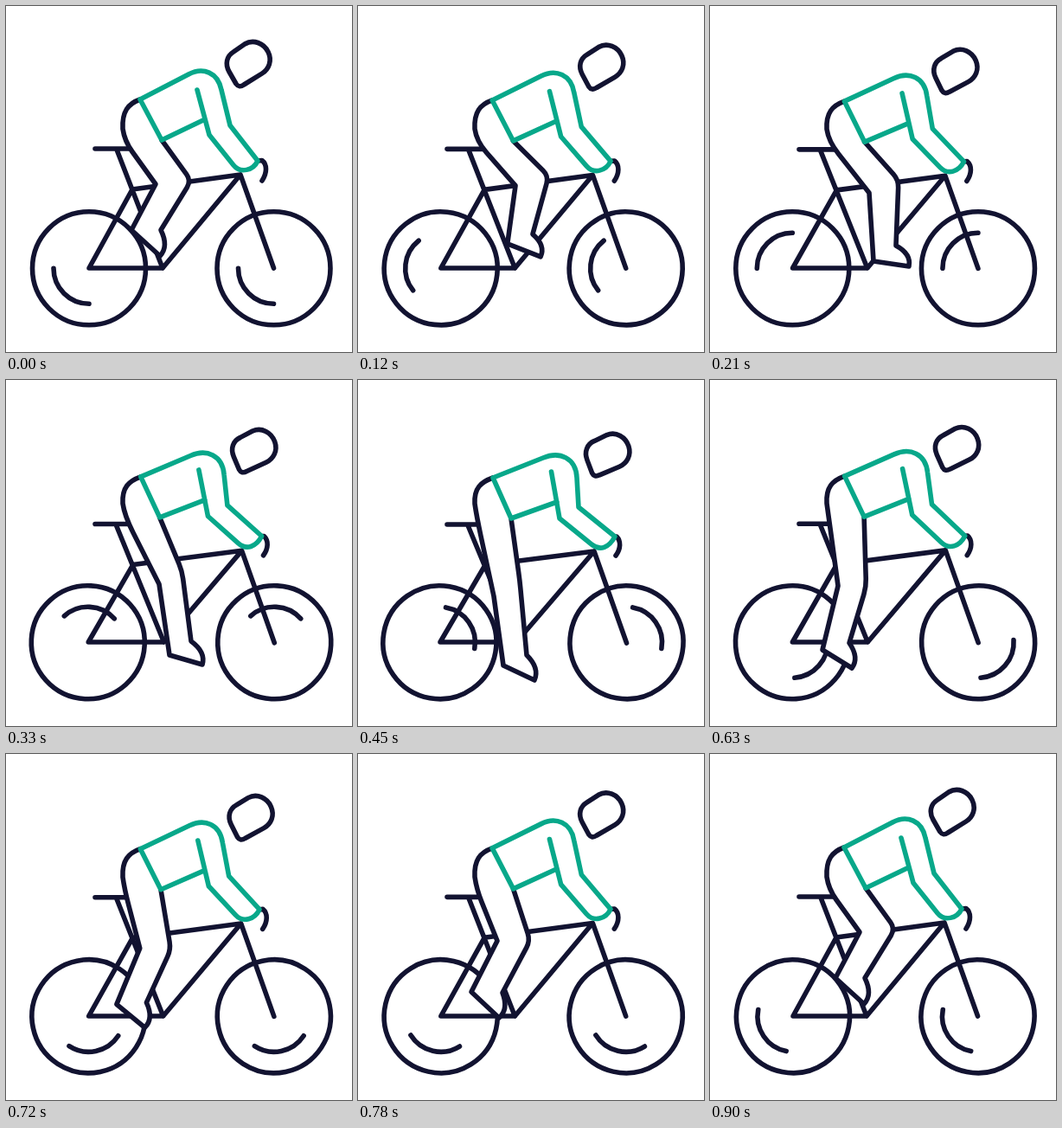
An HTML page that plays this animation: 400 by 400 pixels, repeating every 930 ms.

```html
<!DOCTYPE html>
<html lang="en">
<head>
<meta charset="utf-8">
<title>Cyclist</title>
<style>
  html, body { margin: 0; width: 100%; height: 100%; overflow: hidden; background: #fff; }
  svg { display: block; width: 100vw; height: 100vh; }
  path, circle { fill: none; stroke: #121331; stroke-width: 5.6; stroke-linecap: round; stroke-linejoin: round; }
  #leg { fill: #fff; }
  #shirt { stroke: #08a88a; }
</style>
</head>
<body>
<svg viewBox="0 0 400 400">
  <defs>
    <g id="wheel">
      <circle r="65.5"/>
      <path d="M0 41A41 41 0 0 1 -41 0"/>
    </g>
  </defs>
  <g id="rear"><circle r="65.5"/><path d="M0 41A41 41 0 0 1 -41 0"/></g>
  <g id="front"><circle r="65.5"/><path d="M0 41A41 41 0 0 1 -41 0"/></g>
  <path id="bike"/>
  <path id="leg"/>
  <path id="shirt"/>
  <path id="head" d="M266 90L258 76C253 67 255 58 263 53L276 44C286 38 298 43 303 53C308 63 304 73 296 78L275 91Q269.5 95 266 90Z"/>
</svg>
<script>
const STEP = 30, STEPS = 31, CYCLE = 30;
const el = id => document.getElementById(id);
const lerp = (a, b, p) => a + (b - a) * p;

// Upright and crouched outlines, blended number by number.
const bike = [
  'M103 165L144 165M128 166L181 303L96 303L146 212L271 195L181 303M271 195L309.5 303M291 179L296 178.5C302 183 302 193 296 202',
  'M103 167L144 167M127 168L183 303L95 303L147 214L273 198L183 303M273 198L310.5 304M297 181L299 181C304 186 304 195 298 203'
];
const shirt = [
  'M230 131L180 155L155 108L211 79C228 70 245 77 249 97L259 138L291 179C286 190 271 194 263 184L235 149L221 97',
  'M230 141L177 160L156 113L214 90C233 82 252 90 253 113L255 147L297 181C290 194 280 198 270 190L233 160L223.5 106'
];

function blend([a, b], p) {
  const ends = b.match(/[\d.]+/g);
  let i = 0;
  return a.replace(/[\d.]+/g, n => lerp(+n, +ends[i++], p).toFixed(2));
}

// step, crouch, back of knee, heel, toe, ankle, kneecap
const poses = [
  [0, 0, 173, 206, 145, 259, 178, 289, 179, 259, 214, 202],
  [7, .43, 184, 216, 189, 295, 230, 301, 215, 277, 218, 201],
  [11, .77, 177, 236, 189, 318, 227, 329, 214, 302, 203.5, 221],
  [15, 1, 157, 250, 168, 330, 204, 347, 195, 318, 187, 232],
  [21, .63, 148, 238, 130, 312, 164, 333, 161, 304, 180.5, 239],
  [26, .17, 161, 216, 131, 275, 163, 305, 167, 276, 199, 216]
];
const spin = [[0, 0], [7, 90], [11, 138], [15, 190], [21, 266], [26, 328], [30, 371]];

function poseAt(i) {
  const n = poses.length, lap = Math.floor(i / n), [k, ...v] = poses[i - lap * n];
  return { k: k + lap * CYCLE, v };
}

// Cyclic cubic Hermite through the poses.
function sample(k) {
  k %= CYCLE;
  const i = poses.findLastIndex(p => p[0] <= k);
  const [a, b, c, d] = [-1, 0, 1, 2].map(o => poseAt(i + o));
  const h0 = b.k - a.k, h = c.k - b.k, h1 = d.k - c.k;
  const u = (k - b.k) / h, w = 1 - u;
  return b.v.map((y, j) => {
    const s0 = (y - a.v[j]) / h0, s = (c.v[j] - y) / h, s1 = (d.v[j] - c.v[j]) / h1;
    const m0 = (s0 * h + s * h0) / (h0 + h), m1 = (s * h1 + s1 * h) / (h + h1);
    return y * (1 + 2 * u) * w * w + c.v[j] * u * u * (3 - 2 * u)
      + h * u * w * (m0 * w - m1 * u);
  });
}

function angleAt(k) {
  const i = Math.min(spin.findLastIndex(s => s[0] <= k), spin.length - 2);
  const [k0, a0] = spin[i], [k1, a1] = spin[i + 1];
  return lerp(a0, a1, (k - k0) / (k1 - k0));
}

function toward(x, y, tx, ty, dist) {
  const f = dist / Math.hypot(tx - x, ty - y);
  return [lerp(x, tx, f), lerp(y, ty, f)];
}

function legPath([p, bx, by, hx, hy, tx, ty, ax, ay, kx, ky]) {
  const waistX = 155 + p, waistY = 108 + 5 * p;
  const hemX = 180 - 3 * p, hemY = 155 + 5 * p;
  const seatX = 137, seatY = 156 + p;
  const dx = tx - ax, dy = ty - ay, out = 10 / Math.hypot(dx, dy);
  const toe = [ax + dx * .62 + dy * out, ay + dy * .62 - dx * out];
  return `M${waistX} ${waistY}C${waistX - 14} ${waistY + 5} 134 ${122 + 3 * p} 135 ${142 + p}`
    + `Q${seatX} ${seatY} ${lerp(seatX, bx, .25)} ${lerp(seatY, by, .25)}`
    + `L${bx} ${by}L${hx} ${hy}L${tx} ${ty}Q${toe} ${ax} ${ay}`
    + `L${toward(kx, ky, ax, ay, 9)}Q${kx} ${ky} ${toward(kx, ky, hemX, hemY, 9)}L${hemX} ${hemY}`;
}

function draw() {
  const k = Math.floor(performance.now() / STEP) % STEPS;
  const pose = sample(k), p = pose[0], a = angleAt(k);
  el('rear').setAttribute('transform', `translate(${96 - 1.6 * p} 303.3) rotate(${a})`);
  el('front').setAttribute('transform', `translate(${309.5 + p} 303.3) rotate(${a})`);
  el('bike').setAttribute('d', blend(bike, p));
  el('leg').setAttribute('d', legPath(pose));
  el('shirt').setAttribute('d', blend(shirt, p));
  el('head').setAttribute('transform', `translate(${8 * p} ${20 * p}) rotate(${9 * p} 280.5 67)`);
  requestAnimationFrame(draw);
}
draw();
</script>
</body>
</html>
```
